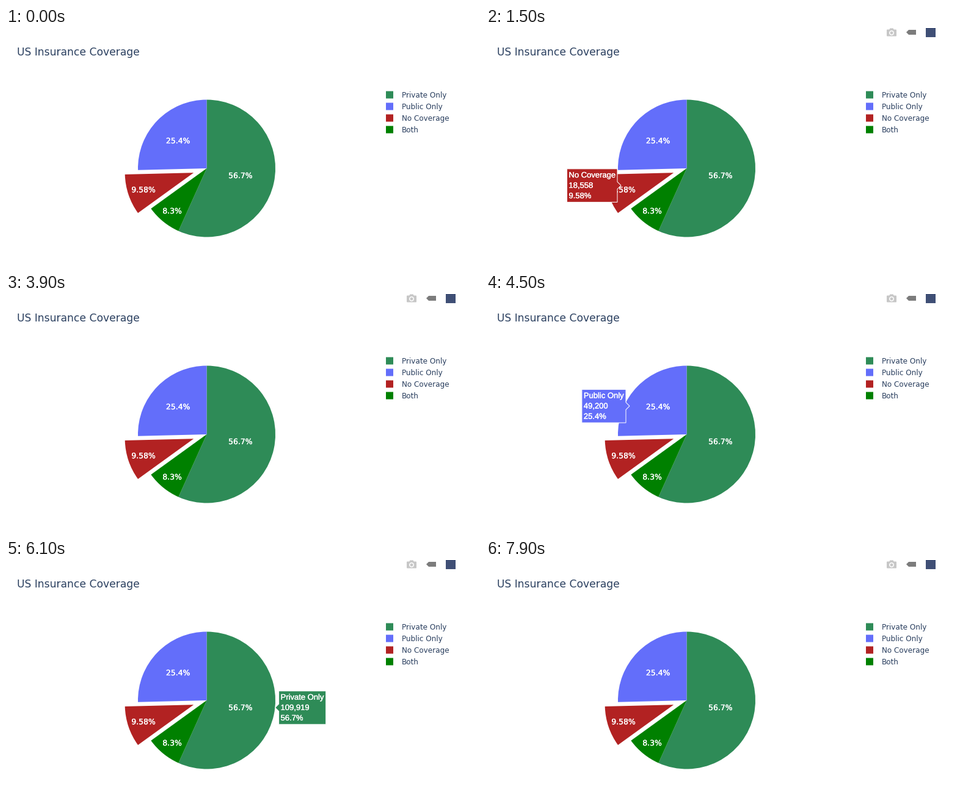
These frames come from a looping animation (776x390 px, 8 s). A matplotlib script:

```python
import matplotlib.pyplot as plt
import numpy as np
from matplotlib.animation import FuncAnimation
from matplotlib.patches import Circle, FancyBboxPatch, Polygon, Rectangle, Wedge
from matplotlib.patheffects import withStroke

plt.rcParams["path.snap"] = False  # keep half-pixel edges soft

W, H, DPI = 776, 390, 100
STEP, FRAMES = 100, 80
PX = 72 / DPI  # points per pixel
INK = "#2a3f5f"
CENTER, RADIUS = (328.5, 230), 112.5
BOLDER = [withStroke(linewidth=0.3 * PX, foreground="white")]

# name, count, share label, colour, pull, label centre
SLICES = [
    ("Private Only", 109919, "56.7%", "#2e8b57", 0, (383.7, 241.5)),
    ("Both", 16085, "8.3%", "#008000", 0, (272, 299.5)),
    ("No Coverage", 18558, "9.58%", "#b22222", 0.2, (225, 264.7)),
    ("Public Only", 49200, "25.4%", "#636efa", 0, (281.5, 184.5)),
]
LEGEND = ["Private Only", "Public Only", "No Coverage", "Both"]

# name: (tip x, tip y, side of the box)
TIPS = {
    "Private Only": (440.6, 241.9, 1),
    "Both": (249.3, 299.4, -1),
    "No Coverage": (221, 258, -1),
    "Public Only": (235, 183.6, -1),
}
# (start, end, name) in milliseconds
HOVERS = [
    (1300, 3800, "No Coverage"),
    (4300, 4900, "Public Only"),
    (4900, 6200, "Private Only"),
    (6200, 7000, "Both"),
    (7000, 7900, "Private Only"),
]

fig = plt.figure(figsize=(W / DPI, H / DPI), dpi=DPI, facecolor="white")
ax = fig.add_axes([0, 0, 1, 1])
ax.set_xlim(0, W)
ax.set_ylim(H, 0)
ax.axis("off")


def label(x, y, text, size, color, font="DejaVu Sans", **kw):
    return ax.text(x, y, text, fontsize=size * PX, color=color, family=font,
                   va="baseline", **kw)


def draw_pie():
    total = sum(s[1] for s in SLICES)
    start = 0
    for name, count, share, color, pull, (tx, ty) in SLICES:
        end = start + 360 * count / total
        mid = np.radians((start + end) / 2)
        x = CENTER[0] + pull * RADIUS * np.sin(mid)
        y = CENTER[1] - pull * RADIUS * np.cos(mid)
        ax.add_patch(Wedge((x, y), RADIUS, start - 90, end - 90, fc=color, lw=0))
        label(tx, ty + 4.5, share, 12.4, "white", ha="center",
              path_effects=BOLDER)
        start = end


def draw_legend():
    colors = {s[0]: s[3] for s in SLICES}
    for i, name in enumerate(LEGEND):
        y = 109.5 + 19 * i
        ax.add_patch(Rectangle((622, y - 6), 12, 12, fc=colors[name], lw=0))
        label(648, y + 4.5, name, 12, INK)


def draw_toolbar():
    gray = "#c7c7c7"
    shapes = [
        FancyBboxPatch((657, 3.5), 14, 9, boxstyle="round,pad=1", fc=gray, lw=0),
        Polygon([(660, 3), (661.5, 0.5), (666.5, 0.5), (668, 3)], fc=gray, lw=0),
        Circle((664, 8), 4, fc="white", lw=0),
        Circle((664, 8), 2.5, fc=gray, lw=0),
        Polygon([(688, 7), (692, 3), (704, 3), (704, 11), (692, 11)],
                fc="#7c7c7c", lw=0),
        Rectangle((720, -1), 16, 16, fc="#3f4f75", lw=0),
    ]
    for shape in shapes:
        ax.add_patch(shape)
    return shapes


def make_tip(name, count, share, color):
    x, y, side = TIPS[name]
    lines = [label(0, y + dy, text, 13, "white", "Liberation Sans",
                   path_effects=BOLDER, zorder=6)
             for dy, text in zip((-13, 4, 21), (name, f"{count:,}", share))]
    width = max(t.get_window_extent().width for t in lines) + 6
    near = x + 6 * side
    far = near + width * side
    for t in lines:
        t.set_x(min(near, far) + 3)
    top, bottom = y - 27.2, y + 27.4
    box = Polygon([(x, y), (near, y - 6), (near, top), (far, top),
                   (far, bottom), (near, bottom), (near, y + 6)],
                  fc=color, ec="white", lw=PX, zorder=5)
    ax.add_patch(box)
    return [box, *lines]


label(18, 45, "US Insurance Coverage", 17.1, INK)
draw_pie()
draw_legend()
toolbar = draw_toolbar()
tips = {s[0]: make_tip(*s[:4]) for s in SLICES}


def update(n):
    now = n * STEP
    fade = np.clip((now - 700) / 250, 0, 1)
    for shape in toolbar:
        shape.set_alpha(fade)
    active = next((name for a, b, name in HOVERS if a <= now < b), None)
    for name, parts in tips.items():
        for part in parts:
            part.set_visible(name == active)
    return []


anim = FuncAnimation(fig, update, frames=FRAMES, interval=STEP,
                     init_func=lambda: update(0), repeat=True, repeat_delay=0)
plt.show()
```
